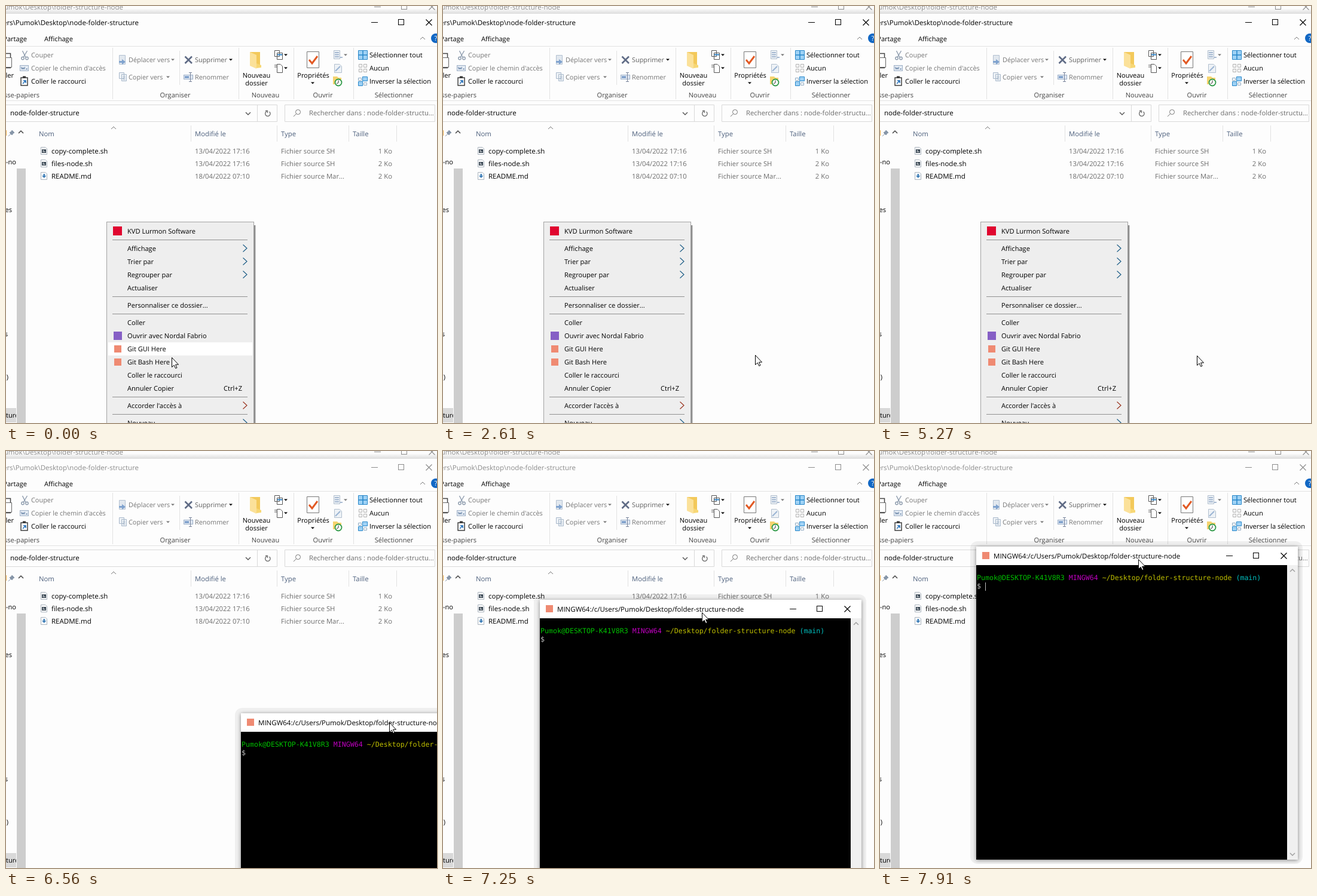
Recreate the animation shown at these times as an HTML page. Size 721 by 698 pixels, loop 8 s.

```html
<!DOCTYPE html>
<html lang="fr">
<head>
<meta charset="utf-8">
<title>Explorateur</title>
<style>
html, body { margin: 0; width: 100%; height: 100%; overflow: hidden; background: #fdfdfd; }
svg { display: block; width: 721px; height: 698px; }
text { font: 11.1px "Open Sans", "Noto Sans", sans-serif; text-rendering: geometricPrecision; white-space: pre; }
.b text, text.b { font-size: 11.5px; }
.g { fill: #6d6d6d; }
.g text, .h text, text.g { font-size: 11.3px; }
.d { fill: #767676; }
.d text { font-size: 10.9px; }
.h { fill: #4c5f7c; }
.e { text-anchor: end; }
.m { text-anchor: middle; }
.mono text { font: 11.627px "DejaVu Sans Mono", monospace; }
.line { fill: none; stroke: currentColor; }
.sep { stroke: #e2e2e2; }
.blue { color: #1f5f88; }

/* one loop: 8000 ms, every state holds until the next */
.title, .menu, .hover, .term, .caret, .cursor { animation: 8s step-end infinite; }
.title { animation-name: title; }
.menu { animation-name: menu; }
.hover { animation-name: hover; }
.term { animation-name: term; }
.caret { animation-name: caret; }
.cursor { animation-name: cursor; }

@keyframes title { 0% { color: #000; } 71.625%, 100% { color: #8c8c8c; } }
@keyframes menu { 0% { visibility: visible; } 71.625%, 100% { visibility: hidden; } }
@keyframes hover {
  0% { transform: translate(0, 563px); }
  1.5% { transform: translate(0, 585px); }
  32.625% { transform: translate(0, -99px); }
  53.625% { transform: translate(0, 629px); }
  55.625% { transform: translate(0, 607px); }
  57.375% { transform: translate(0, 585px); }
  65.875%, 100% { transform: translate(0, -99px); }
}
@keyframes term {
  0% { transform: translate(900px, 0); }
  71.625% { transform: translate(416px, 450px); }
  82% { transform: translate(393px, 439px); }
  83.875% { transform: translate(327px, 412px); }
  85.375% { transform: translate(256px, 381px); }
  86.875% { transform: translate(200px, 354px); }
  88.75% { transform: translate(171px, 291px); }
  90.625% { transform: translate(162px, 249px); }
  92.125% { transform: translate(159px, 220px); }
  93.625% { transform: translate(158px, 200px); }
  95.5% { transform: translate(160px, 178px); }
  97% { transform: translate(161px, 163px); }
  98.875%, 100% { transform: translate(161px, 160px); }
}
@keyframes caret {
  0% { visibility: hidden; }
  83.875% { visibility: visible; }
  90.625% { visibility: hidden; }
  97%, 100% { visibility: visible; }
}
@keyframes cursor {
  0% { transform: translate(277px, 588px); }
  1.5% { transform: translate(277px, 590px); }
  32.625% { transform: translate(522px, 584px); }
  34.125% { transform: translate(900px, 0); }
  51.75% { transform: translate(531px, 596px); }
  53.625% { transform: translate(396px, 637px); }
  55.625% { transform: translate(352px, 616px); }
  57.375% { transform: translate(331px, 601px); }
  59.25% { transform: translate(331px, 600px); }
  65.875% { transform: translate(530px, 585px); }
  67.875% { transform: translate(900px, 0); }
  71.625% { transform: translate(687px, 471px); }
  82% { transform: translate(641px, 454px); }
  83.875% { transform: translate(588px, 428px); }
  85.375% { transform: translate(523px, 398px); }
  86.875% { transform: translate(469px, 372px); }
  88.75% { transform: translate(441px, 311px); }
  90.625% { transform: translate(433px, 270px); }
  92.125% { transform: translate(430px, 241px); }
  93.625% { transform: translate(429px, 221px); }
  95.5% { transform: translate(431px, 199px); }
  97% { transform: translate(432px, 184px); }
  98.875%, 100% { transform: translate(432px, 181px); }
}
</style>
</head>
<body>
<svg viewBox="0 0 721 698">
  <defs>
    <path id="up" class="line" d="M-4 2 0-2 4 2"/>
    <path id="right" class="line" stroke-width="1.2" d="M-3.5-6 3-0 -3.5 6"/>
    <path id="drop" d="M-3-1.5H3L0 1.5Z"/>
    <g id="buttons" class="line">
      <path d="M0 .5H11"/>
      <path d="M91.5-4.5l10 10m0-10-10 10" stroke-width="1.200"/>
      <rect x="45.5" y="-4.5" width="9" height="9"/>
    </g>
    <g id="page">
      <path d="M.5.5H8L10.5 3V12.5H.5Z" fill="#fff" stroke="#a9b3bd"/>
    </g>
    <g id="script">
      <use href="#page"/>
      <path d="M2 4H9V10H2Z" fill="#34424f"/>
      <path d="M3.5 6H6M3.5 8H7.500" stroke="#fff"/>
    </g>
    <g id="docs" fill="#eef2f6" stroke="#a9b9cb">
      <path d="M.5.5H8.500V10.500H.5ZM4.500 3.500H12.500V14.500H4.500Z"/>
      <path d="M6.500 7H10.500M6.500 9.500H10.500M6.500 12H10.500"/>
    </g>
    <clipPath id="nav"><path d="M0 195H17V698H0Z"/></clipPath>
    <linearGradient id="edge" x2="0" y2="1">
      <stop stop-color="#fdfdfd"/>
      <stop offset="1" stop-color="#dcdcdc"/>
    </linearGradient>
  </defs>

  <!-- window behind -->
  <rect width="721" height="698" fill="#fdfdfd"/>
  <rect y="4" width="721" height="9" fill="url(#edge)"/>
  <g color="#8c8c8c">
    <text class="e b" x="196" y="6" fill="#8c8c8c">C:\Users\Pumok\Desktop\folder-structure-node</text>
    <use href="#buttons" x="616" y="1"/>
  </g>

  <!-- title bar and tabs -->
  <g class="title">
    <text class="e b" x="222" y="32" fill="currentColor">C:\Users\Pumok\Desktop\node-folder-structure</text>
    <use href="#buttons" x="611" y="27"/>
  </g>
  <text class="e" x="35" y="59">Partage</text>
  <text x="64" y="59">Affichage</text>
  <use href="#up" x="697" y="54" color="#777"/>
  <circle cx="719" cy="54" r="8" fill="#1167c4"/>
  <text class="m" x="719" y="58" fill="#fff" font-weight="700">?</text>

  <!-- ribbon -->
  <path class="sep" d="M0 67.500H721M0 158.500H721M178.500 70V156M290.500 75V132M389.500 70V156M481.500 70V156M581.500 70V156"/>
  <g class="d">
    <text x="42" y="86">Couper</text>
    <text x="42" y="108">Copier le chemin d'accès</text>
    <text x="205" y="94">Déplacer vers</text>
    <text x="205" y="123">Copier vers</text>
    <text x="316" y="94" fill="#606060">Supprimer</text>
    <text x="316" y="123">Renommer</text>
    <use href="#drop" x="279" y="90"/>
    <use href="#drop" x="271" y="119"/>
    <use href="#drop" x="568" y="82"/>
  </g>
  <g fill="#000">
    <text class="e" x="13" y="120">Coller</text>
    <text x="42" y="130">Coller le raccourci</text>
    <g class="m">
      <text x="419" y="120">Nouveau</text>
      <text x="419" y="133">dossier</text>
      <text x="514" y="120">Propriétés</text>
    </g>
    <text x="608" y="86">Sélectionner tout</text>
    <text x="608" y="108">Aucun</text>
    <text x="608" y="130">Inverser la sélection</text>
    <use href="#drop" x="376" y="90"/>
    <use href="#drop" x="468" y="82"/>
    <use href="#drop" x="468" y="104"/>
    <use href="#drop" x="513" y="129"/>
  </g>
  <g fill="#444">
    <text class="e" x="56" y="153">Presse-papiers</text>
    <g class="m">
      <text x="283" y="153">Organiser</text>
      <text x="434" y="153">Nouveau</text>
      <text x="530" y="153">Ouvrir</text>
      <text x="649" y="153">Sélectionner</text>
    </g>
  </g>
  <!-- clipboard icons -->
  <path d="M-9 79.500H7.500V103.500H-9" fill="#fff" stroke="#444" stroke-width="1.5"/>
  <path d="M0 86.500H9.500V102.500H0" fill="#fff" stroke="#666"/>
  <g fill="none" stroke="#8d9bad" stroke-width="1.4">
    <path d="M27.500 75 33 86M35.500 75 29 86"/>
    <circle cx="28" cy="87.500" r="2.200"/>
    <circle cx="35" cy="87.500" r="2.200"/>
  </g>
  <rect x="23.500" y="99.500" width="14" height="9" fill="#e3eaf3" stroke="#9eb0c6"/>
  <path d="M25.500 102 27 106 28.500 103 30 106 31.500 102M33 105.500H36" fill="none" stroke="#54749b"/>
  <rect x="25" y="120" width="11" height="13" fill="#fff" stroke="#333" stroke-width="1.400"/>
  <path d="M28 119H33" stroke="#333" stroke-width="3"/>
  <path d="M28 130 32.500 125.500M29 125H33V129" fill="none" stroke="#1667b5" stroke-width="1.400"/>
  <!-- organise icons -->
  <path d="M189.500 82.500H199.500V97.500H189.500Z" fill="#e2e8ef" stroke="#b2c0d0"/>
  <path d="M189 92H194V89L200 93.500 194 98V95H189Z" fill="#7fa2ce"/>
  <use href="#docs" x="189" y="111"/>
  <path d="M299.500 84.500 311 96M311 84.500 299.500 96" stroke="#5f6b85" stroke-width="2.600"/>
  <rect x="297.500" y="115.500" width="15" height="7" fill="#dfe7f2" stroke="#9db0c8"/>
  <path d="M299 119H306" stroke="#6f94c4" stroke-width="3"/>
  <path d="M306 111.500H311M306 126.500H311M308.500 111.500V126.500" stroke="#77839a"/>
  <!-- new folder, properties, open -->
  <path d="M408 77H425V100H408Z" fill="#f3c95b"/>
  <path d="M408 77 419 82V105L408 100Z" fill="#fbe19a"/>
  <path d="M419 82V96L427 99V103L419 104Z" fill="#f7d775"/>
  <g fill="#fff" stroke="#555">
    <path d="M449.500 74.500H457.500V84.500H449.500ZM453.500 78.500H462.500V89.500H453.500Z"/>
    <path d="M454 81.500H462" stroke="#2d83c8" stroke-width="2"/>
    <path d="M453.500 97.500H459L462.500 101V111.500H453.500ZM449 99H453M449 102H453"/>
  </g>
  <path d="M503.500 76.500H523.500V103.500H503.500Z" fill="#fff" stroke="#777"/>
  <path d="M507 90 512 96 521 84" fill="none" stroke="#e25a25" stroke-width="3"/>
  <g fill="#eef2f6" stroke="#b1bfce">
    <path d="M548.500 74.500H558.500V88.500H548.500Z"/>
    <path d="M550 78H557M550 81.500H557M550 85H557M559 86H563" stroke="#8fa7c5" stroke-width="1.500"/>
    <path d="M549.500 97.500H558L561.500 101V111.500H549.500Z"/>
    <path d="M551 109 559 101" stroke="#9ab4d4" stroke-width="2"/>
  </g>
  <path d="M547 118H554L556 120H561V131H547Z" fill="#f5d36f"/>
  <circle cx="556" cy="128" r="5.500" fill="#fff" stroke="#2f9a48" stroke-width="1.800"/>
  <path d="M556 124.500V128.500L553 130" fill="none" stroke="#333"/>
  <!-- selection icons -->
  <path d="M589.500 74.500H604.500V89.500H589.500Z" fill="#9fd2f5" stroke="#2786c9"/>
  <path d="M597 74V90M589 82H605" stroke="#2786c9" stroke-width="1.500"/>
  <path d="M590.500 97.500h5v5h-5ZM598.500 97.500h5v5h-5ZM590.500 105.500h5v5h-5ZM598.500 105.500h5v5h-5Z" fill="#fff" stroke="#b0b0b0"/>
  <path d="M596.500 118.500h8v7h-8ZM589.500 126.500h7v7h-7Z" fill="#9fd2f5" stroke="#2786c9"/>
  <path d="M589.500 120.500h5v4h-5ZM598.500 128.500h5v4h-5Z" fill="#fff" stroke="#8ea9c0"/>

  <!-- address and search -->
  <path d="M-1 165.500H453.500V193.500H-1M420.500 165V194M466.500 165.500H717.500V193.500H466.500Z" fill="none" stroke="#d9d9d9"/>
  <text class="b" x="7" y="183">node-folder-structure</text>
  <path class="line" color="#555" stroke-width="1.400" d="M401 178 405 182 409 178"/>
  <path class="line" color="#666" stroke-width="1.300" d="M436 176.500A4.200 4.200 0 1 0 440.500 177M434 175.500H437.500V179"/>
  <path class="line" color="#777" d="M485.500 180.500 481 185"/>
  <circle class="line" color="#777" cx="488.500" cy="177.500" r="4"/>
  <text class="g" x="507" y="183">Rechercher dans : node-folder-structu...</text>

  <!-- file list -->
  <use href="#up" x="180" y="204" color="#777"/>
  <path class="sep" d="M309.500 200V227M453.500 200V227M573.500 200V227M653.500 200V227"/>
  <g class="h">
    <text x="55" y="218">Nom</text>
    <text x="316" y="218">Modifié le</text>
    <text x="460" y="218">Type</text>
    <text x="580" y="218">Taille</text>
  </g>
  <use href="#script" x="58" y="236"/>
  <use href="#script" x="58" y="257"/>
  <use href="#page" x="58" y="278"/>
  <path d="M62.500 281h2.500v3h2.500L63.750 288 60 284h2.500Z" fill="#3f7fb8"/>
  <g class="b">
    <text x="76" y="247">copy-complete.sh</text>
    <text x="76" y="268">files-node.sh</text>
    <text x="76" y="289">README.md</text>
  </g>
  <g class="g">
    <text x="316" y="247">13/04/2022 17:16</text>
    <text x="316" y="268">13/04/2022 17:16</text>
    <text x="316" y="289">18/04/2022 07:10</text>
    <text x="460" y="247">Fichier source SH</text>
    <text x="460" y="268">Fichier source SH</text>
    <text x="460" y="289">Fichier source Mar...</text>
    <g class="e">
      <text x="646" y="247">1 Ko</text>
      <text x="646" y="268">2 Ko</text>
      <text x="646" y="289">2 Ko</text>
    </g>
  </g>

  <!-- navigation pane -->
  <rect x="18" y="272" width="15" height="426" fill="#cdcdcd"/>
  <use href="#up" x="25" y="211" color="#444" stroke-width="1.500"/>
  <g clip-path="url(#nav)">
    <rect y="673" width="17" height="24" fill="#d9d9d9"/>
    <path d="M0 208V217" stroke="#f0b04a" stroke-width="2"/>
    <path d="M10 208 14 212 12 213 10 216 6 212 9 210ZM8 214 4 218" fill="#8796a8" stroke="#8796a8"/>
    <text class="e" x="17" y="265">-no</text>
    <text class="e" x="10" y="345">es</text>
    <text class="e" x="3" y="553">s</text>
    <text class="e" x="4" y="625">)</text>
    <text x="0" y="689">ture</text>
  </g>

  <!-- context menu -->
  <g class="menu">
    <path d="M414 367H418V698H414Z" fill="#000" opacity=".22"/>
    <path d="M414 367H416.500V698H414Z" fill="#000" opacity=".35"/>
    <rect x="168.500" y="361.500" width="246" height="345" fill="#eee" stroke="#a3a3a3"/>
    <rect class="hover" x="171" width="241" height="22" fill="#fff"/>
    <path d="M178 391.500H404M178 486.500H404M178 515.500H404M178 654.500H404M178 683.500H404" stroke="#919191"/>
    <rect x="179" y="369" width="15" height="15" fill="#e0062f"/>
    <rect x="180" y="545" width="14" height="14" fill="#865fc5"/>
    <rect x="181" y="568" width="12" height="12" fill="#ef8a72"/>
    <rect x="181" y="590" width="12" height="12" fill="#ef8a72"/>
    <text x="203" y="381">KVD Lurmon Software</text>
    <text x="203" y="410">Affichage</text>
    <text x="203" y="432">Trier par</text>
    <text x="203" y="454">Regrouper par</text>
    <text x="203" y="476">Actualiser</text>
    <text x="203" y="505">Personnaliser ce dossier...</text>
    <text x="203" y="534">Coller</text>
    <text x="203" y="556">Ouvrir avec Nordal Fabrio</text>
    <text x="203" y="578">Git GUI Here</text>
    <text x="203" y="600">Git Bash Here</text>
    <text x="203" y="622">Coller le raccourci</text>
    <text x="203" y="644">Annuler Copier</text>
    <text class="e" x="395" y="644">Ctrl+Z</text>
    <text x="203" y="673">Accorder l'accès à</text>
    <text x="203" y="702">Nouveau</text>
    <g class="blue">
      <use href="#right" x="400" y="405.500"/>
      <use href="#right" x="400" y="427.500"/>
      <use href="#right" x="400" y="449.500"/>
      <use href="#right" x="400" y="697.500"/>
    </g>
    <use href="#right" x="400" y="668.500" color="#9a3520"/>
  </g>

  <!-- terminal -->
  <g class="term">
    <rect x="-10" y="-9" width="556" height="540" rx="12" opacity=".055"/>
    <rect width="538" height="524" fill="#fff" style="filter: drop-shadow(0 1px 3px rgba(0,0,0,.45))"/>
    <rect y="31" width="538" height="493" fill="#f0f0f0"/>
    <rect y="31" width="520" height="493"/>
    <rect x="10" y="9" width="12" height="12" fill="#ef8a72"/>
    <text class="b" x="29" y="20">MINGW64:/c/Users/Pumok/Desktop/folder-structure-node</text>
    <use href="#buttons" x="418" y="15"/>
    <g color="#a0a0a0" stroke-width="1.500">
      <use href="#up" x="529" y="40"/>
      <use href="#up" transform="translate(529 515) scale(1 -1)"/>
    </g>
    <g class="mono">
      <text x="1" y="56"><tspan fill="#00bf00">Pumok@DESKTOP-K41V8R3</tspan> <tspan fill="#bf00bf">MINGW64</tspan> <tspan fill="#bfbf00">~/Desktop/folder-structure-node</tspan> <tspan fill="#00bfbf">(main)</tspan></text>
      <text x="1" y="70" fill="#bfbfbf">$</text>
    </g>
    <rect class="caret" x="15" y="60" width="1" height="14" fill="#bfbfbf"/>
  </g>

  <path class="cursor" d="M.5.5V16.500L4.200 13.200 6.700 18.500 9 17.500 6.600 12.200H11.500Z" fill="#fff" stroke="#000"/>
</svg>
</body>
</html>
```
